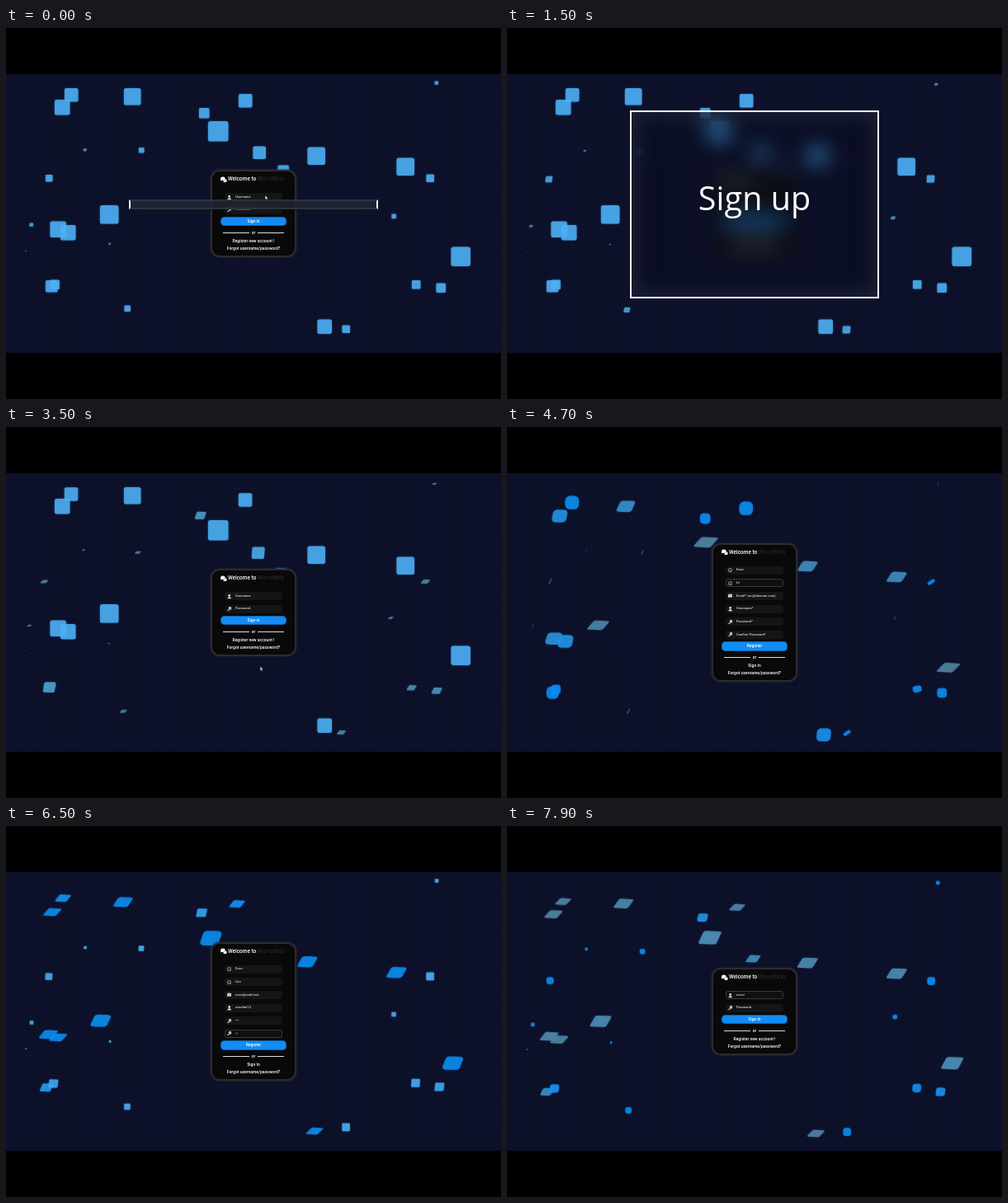
An HTML page with a canvas that plays this animation: 600 by 450 pixels, repeating every 8 s.

```html
<!DOCTYPE html>
<html lang="en">
<head>
<meta charset="utf-8">
<title>Sign up</title>
<style>
  html, body { margin: 0; width: 100%; height: 100%; overflow: hidden; background: #000; }
  body { position: relative; font: 500 5px Roboto, Arial, sans-serif; color: #fff; }
  body * { box-sizing: border-box; position: absolute; }
  canvas { left: 0; top: 0; width: 600px; height: 450px; }

  .card { left: 248px; width: 104px; border: 2px solid #2b2b2f; border-radius: 11px; background: #09090a; box-shadow: 0 0 3px #2c2c32; }
  .card > * { white-space: nowrap; }
  .chat { left: 9.8px; top: 5.6px; width: 7.8px; height: 7.4px; }
  .hello { left: 18.9px; top: 5px; font-size: 6.5px; line-height: 9px; }
  .brand { left: 54.5px; top: 5px; font: 7px/9px "DejaVu Sans", sans-serif; letter-spacing: .5px; color: #2e3237; }
  .field { left: 15px; width: 70px; height: 10px; border: 1px solid #151518; border-radius: 3px; background: #151518; }
  .field.on { border-color: #38383d; background: #101012; }
  .field svg { left: 2px; top: 1.5px; width: 5.4px; height: 5.4px; }
  .field span { left: 12px; top: -.3px; font-size: 4.1px; line-height: 8.8px; color: #d8d8dc; }
  .button { left: 10px; width: 80px; height: 11.4px; border: 1px solid #0c62ae; border-radius: 4.5px; background: #128cf5; line-height: 9.6px; text-align: center; }
  .or, .link { left: 0; width: 100%; line-height: 8px; text-align: center; }
  .or::before, .or::after { content: ""; position: absolute; top: 4px; width: 32px; height: 1px; background: #ddd; }
  .or::before { left: 13px; }
  .or::after { right: 13px; }

  .pointer { left: 0; top: 0; width: 4px; height: 6px; animation: point 8s infinite; }
  @keyframes point {
    0%, 33% { transform: translate(314px, 203px); }
    41%, 44% { transform: translate(308px, 290.5px); }
    47.5%, 48.74% { transform: translate(303px, 257px); opacity: 1; }
    48.75%, 100% { transform: translate(303px, 257px); opacity: 0; }
  }

  .title { left: 149px; width: 302px; overflow: hidden; border: 2px solid #fff; background: rgba(8, 12, 32, .3);
    box-shadow: inset 0 0 24px 5px rgba(52, 56, 68, .5); backdrop-filter: blur(12px); animation: unfold 8s infinite; }
  .title span { left: 0; top: 50%; width: 100%; margin-top: -35px; font: 39.5px/54px "Open Sans", "Noto Sans", sans-serif;
    text-align: center; animation: fade 8s infinite; }
  @keyframes unfold {
    0% { top: 208px; height: 12px; border-top-color: #27343c; border-bottom-color: #27343c; animation-timing-function: ease-out; }
    8%, 31% { top: 100px; height: 228px; border-color: #fff; opacity: 1; animation-timing-function: ease-in; }
    37.4% { top: 212px; height: 4px; border-color: #fff; opacity: 1; }
    37.5%, 100% { top: 212px; height: 4px; opacity: 0; }
  }
  @keyframes fade {
    0%, 4% { opacity: 0; }
    10%, 28% { opacity: 1; }
    32%, 100% { opacity: 0; }
  }
</style>
</head>
<body>
<svg width="0" height="0">
  <symbol id="user" viewBox="0 0 10 10"><circle cx="5" cy="2.6" r="2.5" fill="#eee"/><path d="M.6 10q0-4.2 4.4-4.2T9.4 10z" fill="#eee"/></symbol>
  <symbol id="key" viewBox="0 0 10 10"><circle cx="6.6" cy="3.4" r="2.3" fill="none" stroke="#eee" stroke-width="2"/><path d="M5 5 1 9M2.5 7.5 4 9" stroke="#eee" stroke-width="1.8"/></symbol>
  <symbol id="face" viewBox="0 0 10 10"><g fill="none" stroke="#ddd"><circle cx="5" cy="5" r="4.3"/><path d="M2.8 6q2.2 2.6 4.4 0M3.4 3v1.4M6.6 3v1.4"/></g></symbol>
  <symbol id="mail" viewBox="0 0 10 10"><path d="M0 1.5h10v7H0z" fill="#eee"/><path d="m0 2.5 5 3.5 5-3.5" fill="none" stroke="#151518"/></symbol>
  <symbol id="chat" viewBox="0 0 17 16"><path d="M9 6.5q8-1 8 4 0 2-1.3 3.1L17 16q-2.5 0-4-1-5 .6-6.5-2.5 5-.8 5.5-6z" fill="#fff"/><ellipse cx="6.2" cy="5.8" rx="6" ry="4.9" fill="#fff"/><path d="M1 8 0 12.2 5 10z" fill="#fff"/></symbol>
</svg>
<canvas></canvas>
<div id="cards"></div>
<svg class="pointer" viewBox="0 0 8 12"><path d="M.5.5v9l2.2-2 1.6 4 1.5-.7-1.6-3.7h3z" fill="#fff" stroke="#222" stroke-width=".6"/></svg>
<div class="title"><span>Sign up</span></div>

<script>
const LOOP = 8000, SIGNUP_FROM = 3.9, SIGNUP_TO = 7.2, ROW = 15.65;

// 0 to 1 while x goes from a to b
const ramp = (a, b, x) => Math.min(1, Math.max(0, (x - a) / (b - a)));
const mix = (a, b, k) => a + (b - a) * k;

// --- Forms: icon, placeholder, typed text, typing start and end in seconds ---
const signin = makeCard(172, 'Sign in', 'Register new account !', [
  ['user', 'Username', 'evanlim12', 7.5, 8.3],
  ['key', 'Password'],
]);
const signup = makeCard(140.7, 'Register', 'Sign In', [
  ['face', 'First Name*', 'Evan', 4.1, 4.36],
  ['face', 'Last Name*', 'Lim', 4.48, 4.8],
  ['mail', 'Email* (wn@domain.com)', 'evan@mail.test', 4.95, 5.4],
  ['user', 'Username*', 'evanlim12', 5.55, 5.95],
  ['key', 'Password*', '•••', 6.05, 6.25],
  ['key', 'Confirm Password*', '•••', 6.33, 6.8],
]);

function makeCard(top, action, link, rows) {
  const card = document.createElement('div');
  const end = 25.8 + rows.length * ROW;
  const at = y => `style="top:${y}px"`;
  card.className = 'card';
  card.style.cssText = `top:${top}px;height:${end + 48.4}px`;
  card.innerHTML = `<svg class="chat"><use href="#chat"/></svg>
    <div class="hello">Welcome to</div><div class="brand">WordNib</div>` +
    rows.map(([icon], i) => `<div class="field" ${at(26 + i * ROW)}>
      <svg><use href="#${icon}"/></svg><span></span></div>`).join('') +
    `<div class="button" ${at(end - 2.2)}>${action}</div>
    <div class="or" ${at(end + 12.5)}>or</div>
    <div class="link" ${at(end + 23)}>${link}</div>
    <div class="link" ${at(end + 31.9)}>Forgot username/password?</div>`;
  document.getElementById('cards').append(card);
  return { card, rows, fields: [...card.querySelectorAll('.field')] };
}

function showCard({ card, rows, fields }, visible, t) {
  card.style.display = visible ? '' : 'none';
  rows.forEach(([, hint, text = '', from = 99, to = 100], i) => {
    const typed = text.slice(0, Math.floor(ramp(from, to, t) * text.length));
    const focus = t >= from - .08 && t <= to + .05;
    const caret = focus ? '|' : '';
    fields[i].classList.toggle('on', focus);
    fields[i].lastElementChild.textContent = typed ? typed + caret : caret + hint;
  });
}

// --- Tumbling squares: x, y, size ---
const squares = [
  [79, 81, 16], [68, 96, 18], [153, 83, 20], [240, 103, 12], [257, 125, 24], [290, 88, 16],
  [307, 151, 15], [376, 155, 21], [336, 173, 13], [484, 168, 21], [514, 182, 9], [522, 66, 4],
  [96, 147, 3], [164, 148, 6], [52, 182, 8], [125, 226, 22], [31, 238, 4], [63, 244, 19],
  [75, 248, 18], [126, 261, 2], [24, 270, 1], [470, 228, 5], [551, 277, 23], [55, 313, 14],
  [59, 311, 11], [147, 340, 7], [386, 362, 17], [412, 365, 9], [497, 311, 10], [527, 315, 11],
];
const LIGHT = [76, 175, 244], GRAY = [79, 132, 160], BLUE = [12, 141, 240];

// Small squares lead, large ones lag; the second half runs faster
function phaseOf(size, t) {
  const slow = 2 * ramp(0, 2, .78 * t - .7 - .25 * (size - 8));
  const s = t - 4.7;
  const fast = 3.3 + 1.38 * s + .1 * s * s - .09 * Math.max(0, size - 8);
  return mix(slow, fast, ramp(3.5, 4.7, t)) % 6;
}

const canvas = document.querySelector('canvas');
const ctx = canvas.getContext('2d');
const dpr = window.devicePixelRatio || 1;
canvas.width = 600 * dpr;
canvas.height = 450 * dpr;

// One cycle: lean over and fade, round off in blue, flip edge-on, lean again, stand up
function drawSquare(x, y, size, p) {
  const lean1 = ramp(0, 2, p), rounding = ramp(2, 2.6, p);
  const lean2 = ramp(4, 5.3, p), rise = ramp(5.3, 6, p);
  const lean = lean1 - rounding + lean2 - rise;
  const round = rounding - lean2;
  const sink = .65 * lean1 - .2 * ramp(3.2, 4.3, p) - .45 * rise;
  const flip = ramp(3, 3.75, p);
  const turn = -Math.PI * flip * flip * (3 - 2 * flip);
  const thin = flip > 0 && flip < 1 ? Math.max(.05, Math.min(1, 3.5 * Math.abs(p - 3.33))) : 1;
  const color = LIGHT.map((c, i) =>
    Math.round(mix(mix(c, GRAY[i], lean1 - rounding), BLUE[i], rounding - rise))).join();
  const side = size + .6;

  ctx.save();
  ctx.translate(x + .2 - .72 * lean * size, y + .3 + sink * size);
  ctx.rotate(turn);
  ctx.transform(side * (1 - .18 * lean), side * .05 * lean,
    -side * .46 * lean, side * (1 - .56 * lean) * thin, 0, 0);
  ctx.beginPath();
  ctx.roundRect(-.5, -.5, 1, 1, .13 + .22 * round);
  ctx.fillStyle = `rgba(${color},.85)`;
  ctx.shadowColor = `rgba(${color},.5)`;
  ctx.shadowBlur = 2.5 * dpr;
  ctx.fill();
  ctx.restore();
}

function drawScene(t) {
  ctx.setTransform(dpr, 0, 0, dpr, 0, 0);
  ctx.fillStyle = '#000';
  ctx.fillRect(0, 0, 600, 450);
  ctx.fillStyle = '#0c1029';
  ctx.fillRect(0, 56, 600, 338);
  ctx.fillStyle = 'rgba(120,140,200,.015)';
  for (let x = 6; x < 600; x += 12) ctx.fillRect(x, 56, 1, 338);
  for (let y = 62; y < 394; y += 12) ctx.fillRect(0, y, 600, 1);
  for (const [x, y, size] of squares) drawSquare(x, y, size, phaseOf(size, t));
}

let start;
function tick(now) {
  start ??= now;
  const t = (now - start) % LOOP / 1000;
  const joining = t >= SIGNUP_FROM && t < SIGNUP_TO;
  drawScene(t);
  showCard(signin, !joining, t);
  showCard(signup, joining, t);
  requestAnimationFrame(tick);
}
requestAnimationFrame(tick);
</script>
</body>
</html>
```
